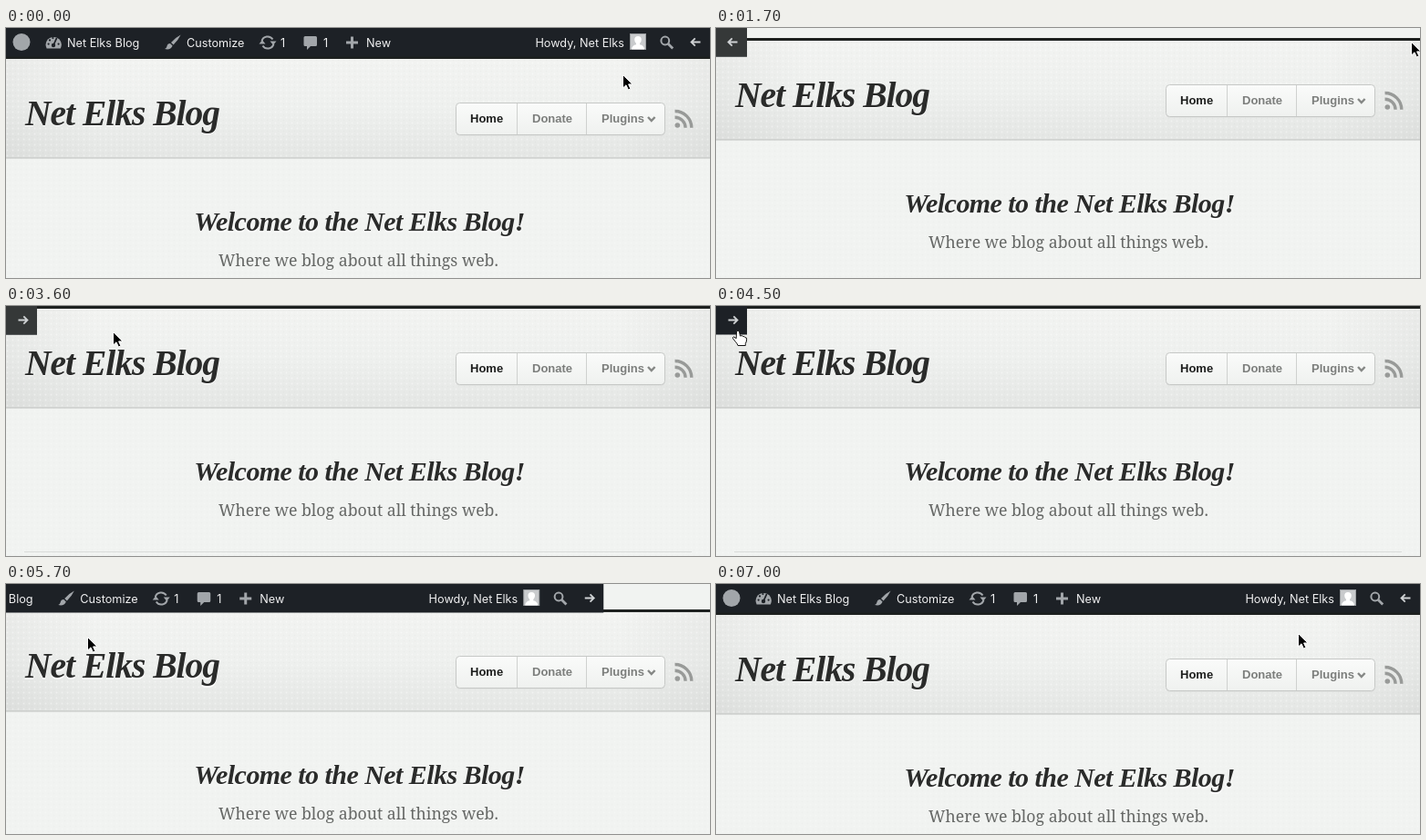
Animation of 772x275 px, one loop 7.1 s. Source, as an HTML page:

```html
<!DOCTYPE html>
<html lang="en">
<head>
<meta charset="utf-8">
<title>Collapsing toolbar</title>
<style>
html, body { margin: 0; width: 100%; height: 100%; overflow: hidden; background: #f1f3f1; }
svg { display: block; width: 772px; height: 275px; }
text { white-space: pre; }
.script { font: italic bold 39.5px "Liberation Serif", serif; letter-spacing: -1px; fill: #2a2b2a; }
.script.small { font-size: 30px; letter-spacing: -.55px; }
.sub { font: 17.7px "Noto Serif", serif; fill: #656765; }
.nav { font: bold 13px "Liberation Sans", sans-serif; fill: #7c7e7c; }
.bar { font: 12.7px Inter, sans-serif; fill: #f0f0f1; }
.icon { fill: #a2a6aa; }
.line { fill: none; stroke: #a2a6aa; stroke-width: 2; }
</style>
</head>
<body>
<svg viewBox="0 0 772 275">
  <defs>
    <linearGradient id="head" x2="0" y2="1">
      <stop offset="0" stop-color="#f2f3f1"/>
      <stop offset=".5" stop-color="#eef0ee"/>
      <stop offset="1" stop-color="#e4e6e4"/>
    </linearGradient>
    <linearGradient id="edge">
      <stop offset="0" stop-color="#000" stop-opacity=".035"/>
      <stop offset=".13" stop-color="#000" stop-opacity="0"/>
      <stop offset=".87" stop-color="#000" stop-opacity="0"/>
      <stop offset="1" stop-color="#000" stop-opacity=".035"/>
    </linearGradient>
    <linearGradient id="button" x2="0" y2="1">
      <stop offset="0" stop-color="#fafbfa"/>
      <stop offset="1" stop-color="#eff1ef"/>
    </linearGradient>
    <pattern id="dots" width="6" height="6" patternUnits="userSpaceOnUse">
      <circle cx="1.5" cy="1.5" r=".9" fill="#fff" opacity=".4"/>
      <circle cx="4.5" cy="4.5" r=".7" fill="#000" opacity=".018"/>
    </pattern>
  </defs>

  <rect width="772" height="275" fill="#f1f3f1"/>

  <g id="page">
    <rect y="112" width="772" height="170" fill="url(#dots)" opacity=".6"/>
    <rect y="3" width="772" height="109" fill="url(#head)"/>
    <rect y="3" width="772" height="109" fill="url(#edge)"/>
    <rect y="3" width="772" height="109" fill="url(#dots)"/>
    <rect y="111.5" width="772" height="1" fill="#bfc1bf"/>
    <rect width="772" height="3" fill="#1d201f"/>
    <g id="titles"></g>
    <text class="sub" x="386.5" y="231" text-anchor="middle">Where we blog about all things web.</text>
    <rect x="20" y="270" width="732" height="1" fill="#d9dbd9"/>

    <rect x="493.5" y="52.5" width="229" height="35" rx="4" fill="#000" opacity=".06"/>
    <rect x="493.5" y="51.5" width="229" height="35" rx="4" fill="url(#button)" stroke="#c6c8c6"/>
    <path d="M560.5 52V86M636.5 52V86" stroke="#cfd1cf"/>
    <text class="nav" x="509" y="73" style="fill:#1e1f1e">Home</text>
    <text class="nav" x="577" y="73">Donate</text>
    <text class="nav" x="653" y="73">Plugins</text>
    <path d="M704 67l3.8 4 3.8-4" fill="none" stroke="#858785" stroke-width="2.4"/>
    <circle cx="736.3" cy="76" r="2.8" fill="#989a98"/>
    <path d="M733.5 67.2a11.6 11.6 0 0 1 11.6 11.6M733.5 60.5a18.3 18.3 0 0 1 18.3 18.3" fill="none" stroke="#989a98" stroke-width="3.4"/>
  </g>

  <g id="bar">
    <rect width="772" height="31.5" fill="#1d2126"/>
    <rect id="lit" x="738" width="34" height="31.5" fill="#353838"/>
    <circle class="icon" cx="17" cy="15.5" r="9.5"/>

    <path class="icon" d="M44.6 22.5a8.6 8.6 0 1 1 15.2 0z"/>
    <path d="M52 19l3.6-8" stroke="#1d2126" stroke-width="1.8"/>
    <g fill="#1d2126">
      <circle cx="52" cy="19" r="2.2"/><circle cx="46.6" cy="17.6" r="1.1"/>
      <circle cx="48" cy="13.4" r="1.1"/><circle cx="51.4" cy="11" r="1.1"/><circle cx="57.6" cy="17.6" r="1.1"/>
    </g>
    <text class="bar" x="67" y="20.5">Net Elks Blog</text>

    <path class="icon" d="M191.6 7.4q-6 3-10.6 8.6l2.6 2.6q5-5 8-11.200zM180 16.900q-3 .2-3.500 3-.5 2.500-2.500 3.200 6.500 1.600 8.600-3.600z"/>
    <text class="bar" x="198" y="20.500">Customize</text>

    <path class="line" d="M280.500 14.500a6.600 6.600 0 0 1 12-2M293.500 17.500a6.600 6.600 0 0 1-12 2"/>
    <path class="icon" d="M289.500 14.500h7l-3.500 4.200zM284.500 17.500h-7l3.500-4.200z"/>
    <text class="bar" x="301" y="20.500">1</text>

    <path class="icon" d="M328 9h11.500q1.500 0 1.500 1.500v8q0 1.500-1.500 1.500H334l-4 4v-4h-2q-1.500 0-1.500-1.500v-8q0-1.500 1.500-1.500z"/>
    <text class="bar" x="348" y="20.500">1</text>

    <path d="M379.500 9.500v13M373 16h13" stroke="#a2a6aa" stroke-width="3"/>
    <text class="bar" x="395" y="20.500">New</text>

    <text class="bar" x="678" y="20.500" text-anchor="end">Howdy, Net Elks</text>
    <rect x="684.500" y="6.500" width="17" height="17" fill="#c9cbcd" stroke="#9a9da0"/>
    <path d="M686 23.500q.5-4.500 5-5.200v-1.300q-1.800-1.600-1.800-4.200 0-3.800 3.800-3.800t3.800 3.800q0 2.600-1.800 4.200v1.300q4.500.7 5 5.200z" fill="#fff"/>

    <circle class="line" cx="722.800" cy="14" r="4.400"/>
    <path d="M726 17.200l5.200 5.200" stroke="#a2a6aa" stroke-width="2.800"/>
    <g id="arrow"><path d="M-5 0H5M-.8-4.200L-5 0-.8 4.200" fill="none" stroke="#cfd2d4" stroke-width="1.800"/></g>
  </g>

  <g id="cursor">
    <path id="pointer" d="M.5.5V15L4 11.800l2.400 5.200 2.500-1.100L6.600 10.900H11z" fill="#000" stroke="#fff" stroke-linejoin="round"/>
    <path id="hand" d="M-1.500 1q1.500-2 3 0l1 5 1.400-.3q1.300-.3 1.800.9 1.700-.5 2.200 1 1.700-.2 1.700 1.600.1 3-1.300 5.300v2H0q-.5-2-2.500-4l-3-3.800q-.4-1.600 1.200-1.800l2.500 1.800z" fill="#fff" stroke="#111" stroke-linejoin="round"/>
  </g>
</svg>
<script>
const LOOP = 7100, STEP = 100, SLIDE = 480;
const BAR_SHIFT = 738, PAGE_SHIFT = 31;
const $ = id => document.getElementById(id);

// Cursor waypoints: time, x, y
const path = [
  [0, 676, 51], [100, 704, 41], [300, 762, 15], [2400, 762, 15], [2800, 590, 20],
  [3200, 352, 24], [3600, 117, 28], [4000, 53, 27], [4500, 24, 27], [5450, 24, 27],
  [5700, 89, 58], [6100, 89, 58], [6500, 240, 75], [6900, 557, 63], [7000, 638, 54], [7100, 676, 51]
];

function title(text, x, y, cls, anchor) {
  const draw = (dy, fill) =>
    `<text class="${cls}" x="${x}" y="${y + dy}" text-anchor="${anchor}" style="${fill}">${text}</text>`;
  return draw(1.5, "fill:#fff") + draw(0, "");
}
$("titles").innerHTML =
  title("Net Elks Blog", 21, 75.5, "script", "start") +
  title("Welcome to the Net Elks Blog!", 387.5, 192, "script small", "middle");

const swing = (t, start) => {
  const p = Math.min(1, Math.max(0, (t - start) / SLIDE));
  return 0.5 - Math.cos(p * Math.PI) / 2;
};
const within = (t, a, b) => t >= a && t < b;
const show = (id, on) => $(id).setAttribute("visibility", on ? "visible" : "hidden");
const move = (id, x, y, extra = "") => $(id).setAttribute("transform", `translate(${x} ${y})${extra}`);

const slope = (i, k) => (path[i + 1][k] - path[i][k]) / (path[i + 1][0] - path[i][0]);
function tangent(i, k) {
  if (i === 0) return slope(0, k);
  if (i === path.length - 1) return slope(i - 1, k);
  const a = slope(i - 1, k), b = slope(i, k);
  return a * b > 0 ? 2 * a * b / (a + b) : 0;
}

// Monotone cubic through the waypoints
function along(t, k) {
  let i = 0;
  while (i < path.length - 2 && t >= path[i + 1][0]) i++;
  const d = path[i + 1][0] - path[i][0], u = (t - path[i][0]) / d, v = 1 - u;
  return path[i][k] * (1 + 2 * u) * v * v + path[i + 1][k] * u * u * (3 - 2 * u) +
    d * u * v * (tangent(i, k) * v - tangent(i + 1, k) * u);
}

function render(ms) {
  const t = Math.floor(ms % LOOP / STEP) * STEP;
  const barHidden = swing(t, 928) - swing(t, 5345);
  const pageUp = swing(t, 1415) - swing(t, 5317);
  move("bar", -BAR_SHIFT * barHidden, 0);
  move("page", 0, PAGE_SHIFT * (1 - pageUp));
  move("arrow", 756.5, 15.5, within(t, 2000, 6200) ? " scale(-1 1)" : "");
  show("lit", within(t, 1000, 4300));

  const onLink = within(t, 300, 1100) || within(t, 4300, 5500);
  show("hand", onLink);
  show("pointer", !onLink);
  move("cursor", along(t, 1), along(t, 2));
}

const begin = performance.now();
function tick() {
  render(performance.now() - begin);
  requestAnimationFrame(tick);
}
tick();
</script>
</body>
</html>
```
